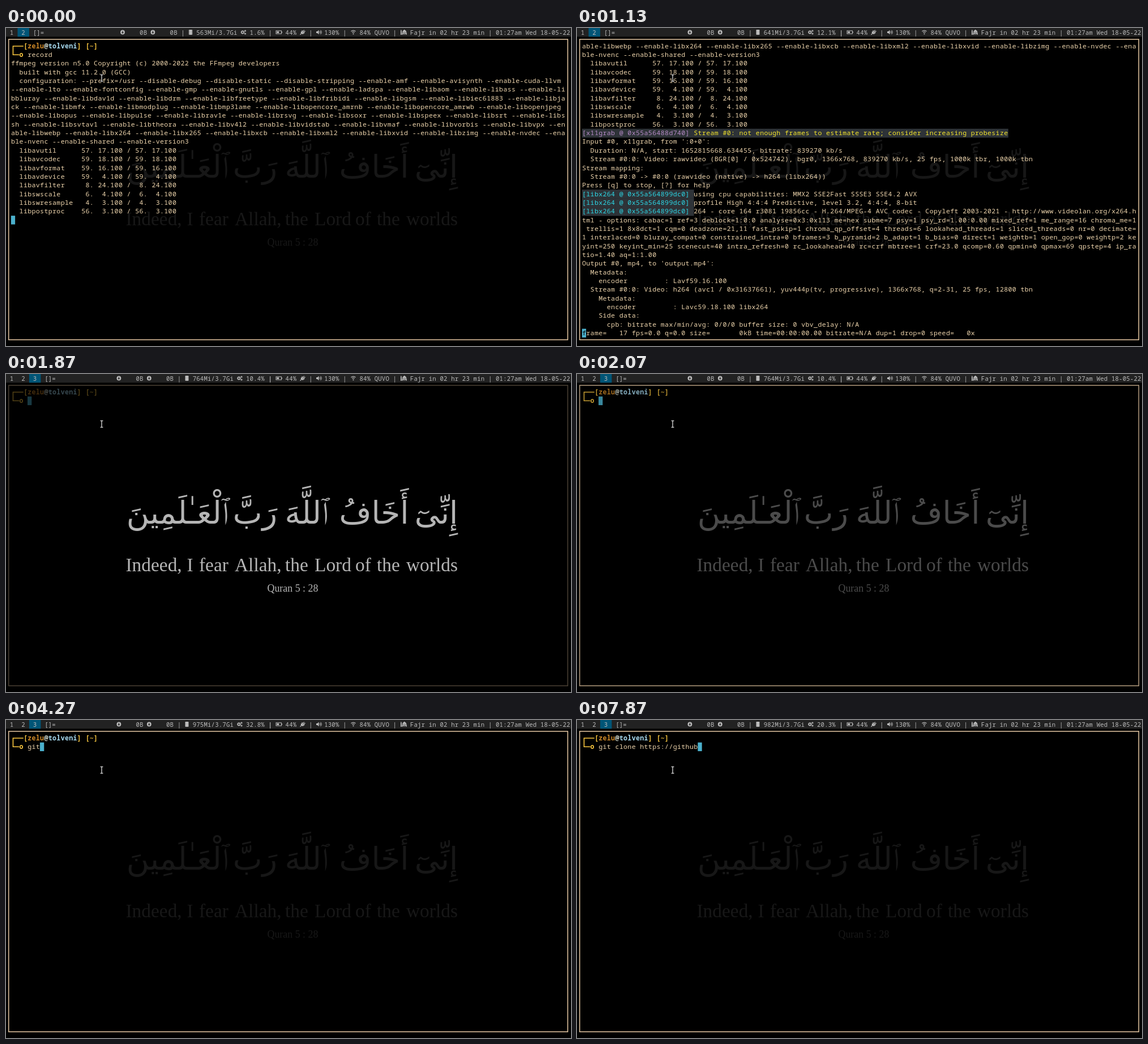
Recreate the animation shown at these times as an HTML page with a canvas. Size 998 by 561 pixels, loop 8000 ms.

```html
<!DOCTYPE html>
<html lang="en">
<head>
<meta charset="utf-8">
<title>Terminal session</title>
<style>
html, body { margin: 0; width: 100%; height: 100%; overflow: hidden; background: #000; }
canvas { display: block; width: 100vw; height: 100vh; }
</style>
</head>
<body>
<canvas id="stage" width="998" height="561"></canvas>
<script>
const ctx = document.getElementById('stage').getContext('2d');
const LOOP = 8000, COLS = 134, ROWS = 34;
const CELL_W = 7.306, CELL_H = 15.343, LEFT = 8.8, TOP = 24.3;
const MONO = '"Noto Sans Mono", "DejaVu Sans Mono", monospace';
const SERIF = '"Liberation Serif", "Noto Serif", serif';
const CREAM = '#edd4ac', GOLD = '#fbc840', CURSOR = '#4bb0cc', BAR = '#bbbbbb', SHADE = '#2e3338';
const USER = 'zelu', HOST = 'tolveni', NETWORK = 'QUVO';

const STYLES = {
  text: { fg: CREAM },
  gold: { fg: GOLD, bold: true },
  user: { fg: '#d08a28', bold: true },
  at: { fg: '#dfe6d8', bold: true },
  host: { fg: '#a9dcf2', bold: true },
  grab: { fg: '#b58ac6', bg: SHADE },
  warn: { fg: '#f4e52c', bg: SHADE },
  codec: { fg: '#2cd6e4', bg: SHADE }
};

// ---- terminal contents ----

const enable = names => names.split(' ').map(n => '--enable-' + n).join(' ');
const libs = [
  ['libavutil', '57. 17.100'], ['libavcodec', '59. 18.100'], ['libavformat', '59. 16.100'],
  ['libavdevice', '59.  4.100'], ['libavfilter', ' 8. 24.100'], ['libswscale', ' 6.  4.100'],
  ['libswresample', ' 4.  3.100'], ['libpostproc', '56.  3.100']
];
const promptTop = [['gold', '   ['], ['user', USER], ['at', '@'], ['host', HOST], ['gold', '] [~]']];
const promptLine = typed => [['gold', '  o '], ['text', typed]];
const plain = s => [['text', s]];
const x264 = s => [['codec', '[libx264 @ 0x55a564899dc0] '], ['text', s]];

const banner = [
  promptTop,
  promptLine('record'),
  ...[
    'ffmpeg version n5.0 Copyright (c) 2000-2022 the FFmpeg developers',
    '  built with gcc 11.2.0 (GCC)',
    '  configuration: --prefix=/usr --disable-debug --disable-static --disable-stripping ' +
      enable('amf avisynth cuda-llvm lto fontconfig gmp gnutls gpl ladspa libaom libass libbluray ' +
        'libdav1d libdrm libfreetype libfribidi libgsm libiec61883 libjack libmfx libmodplug ' +
        'libmp3lame libopencore_amrnb libopencore_amrwb libopenjpeg libopus libpulse librav1e ' +
        'librsvg libsoxr libspeex libsrt libssh libsvtav1 libtheora libv4l2 libvidstab libvmaf ' +
        'libvorbis libvpx libwebp libx264 libx265 libxcb libxml2 libxvid libzimg nvdec nvenc ' +
        'shared version3'),
    ...libs.map(([name, v]) => '  ' + name.padEnd(15) + v + ' / ' + v)
  ].map(plain)
];
const input = [
  [['grab', '[x11grab @ 0x55a56488d740] '],
   ['warn', 'Stream #0: not enough frames to estimate rate; consider increasing probesize']],
  ...[
    "Input #0, x11grab, from ':0+0':",
    '  Duration: N/A, start: 1652815668.634455, bitrate: 839270 kb/s',
    '  Stream #0:0: Video: rawvideo (BGR[0] / 0x524742), bgr0, 1366x768, 839270 kb/s, 25 fps, 1000k tbr, 1000k tbn',
    'Stream mapping:',
    '  Stream #0:0 -> #0:0 (rawvideo (native) -> h264 (libx264))',
    'Press [q] to stop, [?] for help'
  ].map(plain)
];
const encoder = [
  'using cpu capabilities: MMX2 SSE2Fast SSSE3 SSE4.2 AVX',
  'profile High 4:4:4 Predictive, level 3.2, 4:4:4, 8-bit',
  '264 - core 164 r3081 19856cc - H.264/MPEG-4 AVC codec - Copyleft 2003-2021 - ' +
    'http://www.videolan.org/x264.html - options: cabac=1 ref=3 deblock=1:0:0 analyse=0x3:0x113 ' +
    'me=hex subme=7 psy=1 psy_rd=1.00:0.00 mixed_ref=1 me_range=16 chroma_me=1 trellis=1 8x8dct=1 ' +
    'cqm=0 deadzone=21,11 fast_pskip=1 chroma_qp_offset=4 threads=6 lookahead_threads=1 ' +
    'sliced_threads=0 nr=0 decimate=1 interlaced=0 bluray_compat=0 constrained_intra=0 bframes=3 ' +
    'b_pyramid=2 b_adapt=1 b_bias=0 direct=1 weightb=1 open_gop=0 weightp=2 keyint=250 ' +
    'keyint_min=25 scenecut=40 intra_refresh=0 rc_lookahead=40 rc=crf mbtree=1 crf=23.0 ' +
    'qcomp=0.60 qpmin=0 qpmax=69 qpstep=4 ip_ratio=1.40 aq=1:1.00'
].map(x264);
const output = [
  "Output #0, mp4, to 'output.mp4':",
  '  Metadata:',
  '    encoder         : Lavf59.16.100',
  '  Stream #0:0: Video: h264 (avc1 / 0x31637661), yuv444p(tv, progressive), 1366x768, q=2-31, 25 fps, 12800 tbn',
  '    Metadata:',
  '      encoder         : Lavc59.18.100 libx264',
  '    Side data:',
  '      cpb: bitrate max/min/avg: 0/0/0 buffer size: 0 vbv_delay: N/A'
].map(plain);
const status = [plain('frame=   17 fps=0.0 q=0.0 size=       0kB time=00:00:00.00 bitrate=N/A dup=1 drop=0 speed=   0x')];

// Splits styled lines into rows of at most COLS cells.
function wrap(lines) {
  const rows = [];
  for (const line of lines) {
    const cells = line.flatMap(([style, s]) => [...s].map(ch => ({ ch, style: STYLES[style] })));
    for (let i = 0; i < cells.length; i += COLS) rows.push(cells.slice(i, i + COLS));
  }
  return rows;
}
const log = [[0, banner], [70, input], [130, encoder], [200, output], [670, status]]
  .map(([at, lines]) => ({ at, rows: wrap(lines) }));

const COMMAND = 'git clone https://github';
const KEYS = [3800, 4070, 4130, 4330, 4470, 4600, 4730, 4870, 4930, 5070, 5270, 5330,
  5470, 5670, 5800, 6000, 6330, 6530, 7200, 7330, 7470, 7600, 7730, 7870];

// start, memory, cpu
const STATS = [[0, 563, '1.6%'], [600, 641, '12.1%'], [1600, 764, '10.4%'], [2650, 960, '36.5%'],
  [3600, 975, '32.8%'], [4600, 977, '28.4%'], [5600, 979, '25.0%'], [6600, 980, '22.6%'], [7600, 982, '20.3%']];

// workspace change, new window with its fade, and the idle cursor's dark blink
const SWITCH = 1330, OPEN = 1730, FADE = 440, PROMPT = 1800;
const BLINK_OFF = 2670, BLINK_ON = 3470;

// ---- drawing helpers ----

function rect(x, y, w, h, color) {
  ctx.fillStyle = color;
  ctx.fillRect(x, y, w, h);
}
function path(points, color, width) {
  ctx.strokeStyle = color;
  ctx.lineWidth = width;
  ctx.beginPath();
  points.forEach(([x, y], i) => i ? ctx.lineTo(x, y) : ctx.moveTo(x, y));
  ctx.stroke();
}
function disc(x, y, r, color) {
  ctx.fillStyle = color;
  ctx.beginPath();
  ctx.arc(x, y, r, 0, 7);
  ctx.fill();
}
function arc(x, y, r, from, to, color, width) {
  ctx.strokeStyle = color;
  ctx.lineWidth = width;
  ctx.beginPath();
  ctx.arc(x, y, r, from, to);
  ctx.stroke();
}
function shape(points, color) {
  ctx.fillStyle = color;
  ctx.beginPath();
  points.forEach(([x, y]) => ctx.lineTo(x, y));
  ctx.fill();
}
function spaced(s, x, y, step) {
  [...s].forEach((ch, i) => ch !== ' ' && ctx.fillText(ch, x + i * step, y));
}

// ---- wallpaper ----

function wallpaper() {
  ctx.fillStyle = '#fff';
  ctx.textAlign = 'center';
  ctx.direction = 'rtl';
  ctx.font = '55px "DejaVu Sans", sans-serif';
  [['إِنِّىٓ', 760], ['أَخَافُ', 650], ['ٱللَّهَ', 531], ['رَبَّ', 440], ['ٱلْعَـٰلَمِينَ', 303]]
    .forEach(([word, x]) => ctx.fillText(word, x, 264));
  ctx.direction = 'ltr';
  ctx.textAlign = 'left';
  ctx.font = '33.4px ' + SERIF;
  const xs = [211.5, 319.5, 341, 404, 493, 545, 617, 655, 707];
  'Indeed, I fear Allah, the Lord of the worlds'.split(' ')
    .forEach((word, i) => ctx.fillText(word, xs[i], 348));
  ctx.font = '17.9px ' + SERIF;
  ctx.fillText('Quran 5 : 28', 461.5, 384);
}

// ---- terminal window ----

function drawRows(rows, cursor) {
  rows.forEach((cells, r) => {
    const y = TOP + r * CELL_H;
    cells.forEach(({ style }, c) => {
      if (style.bg) rect(LEFT + c * CELL_W, y, CELL_W + 0.5, CELL_H + 0.3, style.bg);
    });
  });
  if (cursor) rect(LEFT + cursor.col * CELL_W, TOP + cursor.row * CELL_H, CELL_W, CELL_H, CURSOR);
  ctx.textAlign = 'center';
  rows.forEach((cells, r) => cells.forEach(({ ch, style }, c) => {
    if (ch === ' ') return;
    const covered = cursor && cursor.row === r && cursor.col === c;
    ctx.font = (style.bold ? 'bold' : '500') + ' 11.6px ' + MONO;
    ctx.fillStyle = covered ? '#000' : style.fg;
    ctx.fillText(ch, LEFT + (c + 0.5) * CELL_W, TOP + r * CELL_H + 11.4);
  }));
  ctx.textAlign = 'left';
}
function promptLines() {
  const x = LEFT + CELL_W / 2, y = TOP + CELL_H / 2;
  path([[LEFT + 3 * CELL_W, y], [x, y], [x, y + CELL_H], [LEFT + 2 * CELL_W, y + CELL_H]], GOLD, 1.6);
}
function windowFrame(alpha) {
  ctx.globalAlpha = alpha * 0.91;
  rect(4, 19, 989, 532, '#000');
  ctx.globalAlpha = alpha;
  ctx.strokeStyle = '#e8c9a4';
  ctx.lineWidth = 1.5;
  ctx.strokeRect(4.7, 20, 987.6, 530);
}
function recorder(t) {
  windowFrame(1);
  const rows = log.filter(part => t >= part.at).flatMap(part => part.rows);
  const done = t >= log[log.length - 1].at;
  const last = done ? rows.length - 1 : rows.length;
  const scroll = Math.max(0, last + 1 - ROWS);
  if (!scroll) promptLines();
  drawRows(rows.slice(scroll), { row: last - scroll, col: 0 });
}
function shell(t) {
  windowFrame(Math.min(1, (t - OPEN) / FADE));
  if (t >= PROMPT) {
    const typed = COMMAND.slice(0, KEYS.filter(k => t >= k).length);
    const lit = t < BLINK_OFF || t >= BLINK_ON;
    promptLines();
    drawRows(wrap([promptTop, promptLine(typed)]), lit && { row: 1, col: 4 + typed.length });
  }
}

// ---- status bar ----

function label(s, x) {
  ctx.fillStyle = BAR;
  ctx.font = '10.7px ' + MONO;
  spaced(s, x, 11.7, 6.576);
}
function arrowIcon(x) {
  disc(x, 7.5, 3.9, BAR);
  path([[x, 5.2], [x, 9]], '#222', 1.2);
  shape([[x - 2.2, 7.4], [x + 2.2, 7.4], [x, 10]], '#222');
}
function chipIcon(x) {
  rect(x + 1, 3, 5, 9, BAR);
  for (let i = 0; i < 4; i++) rect(x, 3.8 + i * 2.1, 7, 1, BAR);
}
function gearIcon(x) {
  arc(x + 3.4, 7.5, 2, 0, 7, BAR, 1.5);
  for (let i = 0; i < 4; i++) {
    const a = i * Math.PI / 4, dx = Math.cos(a), dy = Math.sin(a);
    for (const s of [-1, 1]) rect(x + 2.9 + s * dx * 3, 7 + s * dy * 3, 1, 1, BAR);
  }
  arc(x + 8, 5, 1, 0, 7, BAR, 1.1);
  arc(x + 8, 10, 1, 0, 7, BAR, 1.1);
}
function batteryIcon(x) {
  ctx.strokeStyle = BAR;
  ctx.lineWidth = 1;
  ctx.strokeRect(x + 0.5, 4.8, 9.4, 5.4);
  rect(x + 1.8, 6, 3.8, 3, BAR);
  rect(x + 10.3, 6.3, 1.1, 2.4, BAR);
}
function plugIcon(x) {
  path([[x, 11.8], [x + 3, 9]], BAR, 1.3);
  shape([[x + 2.4, 5.4], [x + 6.8, 9.8], [x + 4.6, 11], [x + 1.6, 9.6], [x + 1.2, 7.6]], BAR);
  path([[x + 3, 4.6], [x + 7.6, 9.2]], BAR, 1.4);
  path([[x + 4.8, 6.2], [x + 7.2, 3.6]], BAR, 1.3);
  path([[x + 6.4, 7.8], [x + 9, 5.2]], BAR, 1.3);
}
function speakerIcon(x) {
  shape([[x, 6], [x + 2, 6], [x + 4.6, 3.6], [x + 4.6, 11.4], [x + 2, 9], [x, 9]], BAR);
  [1.6, 3.2, 4.8].forEach(r => arc(x + 4.6, 7.5, r, -0.9, 0.9, BAR, 0.9));
}
function wifiIcon(x) {
  disc(x + 4.7, 10.3, 1.1, BAR);
  [2.9, 5.6].forEach(r => arc(x + 4.7, 10, r, -2.36, -0.78, BAR, 1.3));
}
function mosqueIcon(x) {
  rect(x, 5, 1.8, 7, BAR);
  shape([[x, 5], [x + 0.9, 2.6], [x + 1.8, 5]], BAR);
  shape([[x + 3, 7.6], [x + 3.4, 5.6], [x + 6.7, 2.8], [x + 10, 5.6], [x + 10.4, 7.6]], BAR);
  rect(x + 2.6, 8, 8.2, 4, BAR);
  rect(x + 4.2, 9.8, 1.2, 2.2, '#222');
  rect(x + 6.2, 9.4, 1.2, 2.6, '#222');
  rect(x + 8.2, 9.8, 1.2, 2.2, '#222');
}
function statusBar(t) {
  rect(0, 0, 998, 15.3, '#222');
  // only workspaces up to the active one are in use
  const active = t < SWITCH ? 2 : 3, tag = 20.46;
  rect((active - 1) * tag, 0, tag, 15.3, '#005577');
  for (let i = 0; i < active; i++) label(String(i + 1), 6.8 + i * tag);
  label('[]=', 6.8 + active * tag);

  const [, mem, cpu] = STATS.filter(s => t >= s[0]).pop();
  const dx = (5 - cpu.length) * 6.576;
  arrowIcon(199.4 + dx);
  label('0B', 229.5 + dx);
  arrowIcon(252.8 + dx);
  label('0B |', 283 + dx);
  chipIcon(316 + dx);
  label(mem + 'Mi/3.7Gi', 329.7 + dx);
  gearIcon(408 + dx);
  label(cpu + ' |', 424);
  if (dx) {
    rect(424, 0, 40, 15.3, '#222');
    label(cpu, 424 + dx);
  }
  label('|', 463.4);
  batteryIcon(476.5);
  label('44%', 493.6);
  plugIcon(519.5);
  label('|', 535);
  speakerIcon(548);
  label('130% |', 562.2);
  wifiIcon(608.8);
  label('84% ' + NETWORK + ' |', 624.4);
  mosqueIcon(697);
  label('Fajr in 02 hr 23 min | 01:27am Wed 18-05-22', 713.8);
}

function pointer() {
  const beam = [[[166.6, 82.5], [171.4, 82.5]], [[169, 82.5], [169, 94]], [[166.6, 94], [171.4, 94]]];
  beam.forEach(p => path(p, '#000', 3));
  beam.forEach(p => path(p, '#d0d0d0', 1.4));
}

function draw(now) {
  const t = now % LOOP;
  ctx.globalAlpha = 1;
  rect(0, 0, 998, 561, '#000');
  wallpaper();
  if (t < SWITCH) recorder(t);
  else if (t >= OPEN) shell(t);
  ctx.globalAlpha = 1;
  statusBar(t);
  pointer();
  requestAnimationFrame(draw);
}
requestAnimationFrame(draw);
</script>
</body>
</html>
```
